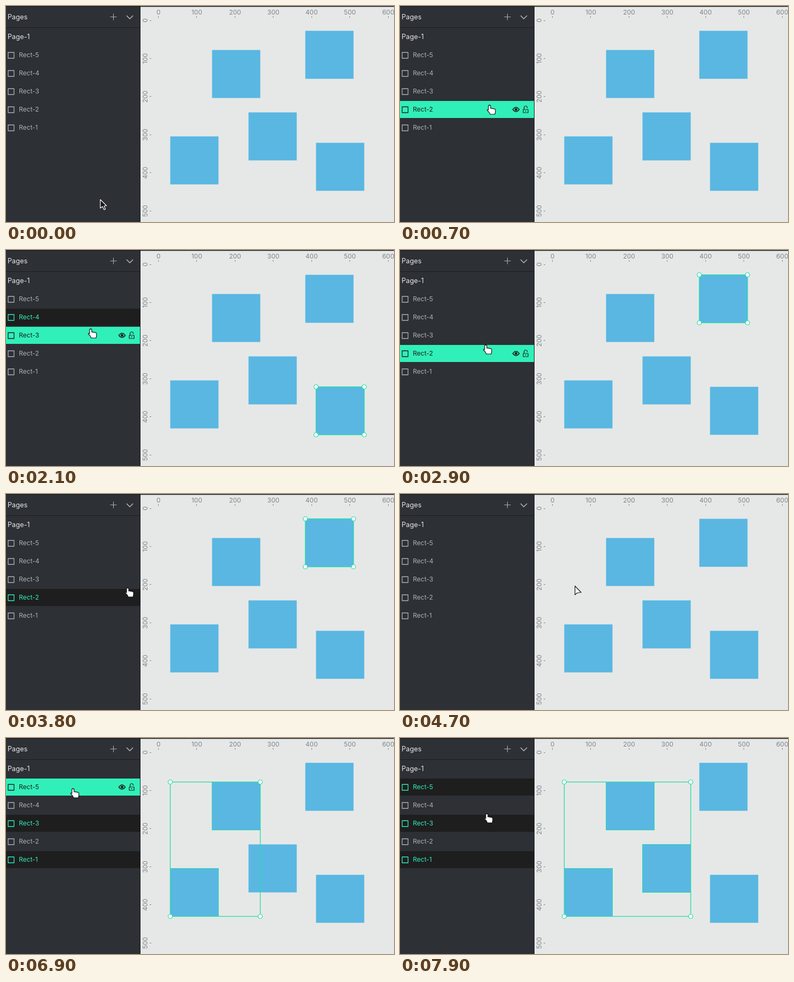
Write an HTML page with a canvas that moves like this. It is 724 by 405 pixels and loops after 8000 ms.

```html
<!DOCTYPE html>
<html lang="en">
<head>
<meta charset="utf-8">
<title>Layer selection</title>
<style>
html, body { margin: 0; overflow: hidden; background: #2d3035; }
canvas { display: block; }
</style>
</head>
<body>
<canvas id="stage" width="724" height="405"></canvas>
<script>
const ctx = document.getElementById('stage').getContext('2d');
const LOOP = 8000, STEP = 100;
const PANEL = '#2d3035', DARK = '#1e1e1f', MINT = '#31efb8', LINE = '#2bdcab', GREY = '#adb0b3';
const SIZE = 90, ROW_HEIGHT = 32;

// Top left corners, indexed by rectangle number
const rects = [null, [384.5, 82.5], [558.5, 46.5], [306.5, 244.5], [578.5, 256.5], [452.5, 199.5]];

// Time, x, y of the pointer tip
const pointer = [
  [0, 176, 363], [300, 176, 363], [900, 162, 97], [1200, 162, 97], [1400, 161, 123],
  [1700, 161, 123], [1900, 161, 146], [2000, 161, 146], [2100, 158, 148], [2300, 158, 148],
  [2700, 160, 178], [3600, 160, 178], [4100, 327, 172], [4600, 327, 172], [4700, 326, 172],
  [5200, 190, 248], [5400, 145, 231], [5700, 145, 231], [5900, 143, 196], [6100, 138, 159],
  [6500, 138, 159], [6900, 125, 95], [7700, 125, 95], [7800, 146, 120], [7900, 162, 142]
];

const selections = [
  [0, []], [1200, [5]], [1700, [4]], [2300, [3]], [2900, [2]],
  [4300, []], [5600, [1]], [6400, [1, 3]], [7500, [1, 3, 5]]
];

const arrow = new Path2D('M0 0V16L4 13L7 19L9.5 18L7 12L11.5 11.5Z');
const canvasArrow = new Path2D('M.5 .5V17L4.5 13.5L12 12.5Z');
const hand = new Path2D('M-2 1Q0 -1 2 1V6Q4 5 5 6.5Q7 5.5 8 7Q11 6.5 11 9V12Q11 14 10 17H1Q0 13 -4 10Q-5 7 -2 9Z');
const eye = new Path2D('M-6 0Q0 -8 6 0Q0 8 -6 0Z');
const lock = new Path2D('M-4.5 0H4.5V6H-4.5ZM-3 0V-3.5A3 3 0 0 1 3 -3.5V-2.5M0 2V4');

const rowTop = n => 76 + (5 - n) * 34;

function pointerAt(t) {
  const next = pointer.findIndex(key => key[0] > t);
  if (next < 0) return pointer.at(-1).slice(1);
  const [t0, x0, y0] = pointer[next - 1], [t1, x1, y1] = pointer[next];
  const k = (t - t0) / (t1 - t0);
  return [x0 + (x1 - x0) * k, y0 + (y1 - y0) * k].map(Math.round);
}

function box(color, x, y, w, h) {
  ctx.fillStyle = color;
  ctx.fillRect(x, y, w, h);
}

function text(label, x, y, size, color, align = 'left') {
  ctx.font = `${size}px Inter, sans-serif`;
  ctx.textAlign = align;
  ctx.fillStyle = color;
  ctx.fillText(label, x, y);
}

function shape(path, x, y, fill, stroke, width = 1) {
  ctx.save();
  ctx.translate(x, y);
  ctx.lineWidth = width;
  ctx.lineJoin = 'round';
  if (fill) { ctx.fillStyle = fill; ctx.fill(path); }
  if (stroke) { ctx.strokeStyle = stroke; ctx.stroke(path); }
  ctx.restore();
}

function drawRulers() {
  const color = '#7e8489';
  for (let i = 0; i <= 6; i++) {
    const x = 284.5 + i * 71.45, y = 27 + i * 71.45;
    text(i * 100, x, 15.5, 12, color, 'center');
    box(color, Math.floor(x), 19, 1, 3);
    box(color, 268, Math.floor(y), 3, 1);
    ctx.save();
    ctx.translate(263.5, y);
    ctx.rotate(-Math.PI / 2);
    text(i * 100, 0, 0, 12, color, 'center');
    ctx.restore();
  }
}

function drawSelection(selected) {
  if (!selected.length) return;
  const xs = selected.map(n => rects[n][0]), ys = selected.map(n => rects[n][1]);
  const left = Math.min(...xs), right = Math.max(...xs) + SIZE;
  const top = Math.min(...ys), bottom = Math.max(...ys) + SIZE;
  ctx.strokeStyle = LINE;
  ctx.lineWidth = 1;
  for (const n of selected) ctx.strokeRect(...rects[n], SIZE, SIZE);
  ctx.lineWidth = 1.4;
  ctx.strokeRect(left, top, right - left, bottom - top);
  const handle = new Path2D();
  handle.arc(0, 0, 4, 0, 7);
  for (const x of [left, right])
    for (const y of [top, bottom]) shape(handle, x, y, '#fff', LINE, 1.2);
}

function drawPanel(selected, hovered) {
  box(PANEL, 0, 0, 250, 405);
  box('#1c1d20', 0, 40, 250, 1);
  box('#1c1d20', 250, 0, 1, 405);
  text('Pages', 3, 25, 12.7, '#e6e7e8');
  text('Page-1', 3, 62, 12.7, '#e6e7e8');
  shape(new Path2D('M-6 0H6M0 -6V6'), 200.5, 20.5, null, GREY, 1.1);
  shape(new Path2D('M-6 -3L0 3L6 -3'), 231, 21, null, '#c5c7c9', 1.3);
  for (let n = 5; n; n--) {
    const y = rowTop(n), hot = n === hovered, on = selected.includes(n);
    if (hot || on) box(hot ? MINT : DARK, 0, y, 250, ROW_HEIGHT);
    const color = hot ? DARK : on ? MINT : GREY;
    shape(new Path2D('M0 0H11V11H0Z'), 4, y + 11, null, color, 1.3);
    text(`Rect-${n}`, 24, y + 20, 12, color);
    if (!hot) continue;
    shape(eye, 216.5, y + 16, null, DARK, 1.5);
    const pupil = new Path2D();
    pupil.arc(0, 0, 2.5, 0, 7);
    shape(pupil, 216.5, y + 16, DARK);
    shape(lock, 234.5, y + 16, null, DARK, 1.2);
  }
}

function drawPointer(x, y) {
  if (x > 250) shape(canvasArrow, x, y, '#f4f5f5', '#151515', 1.2);
  else if (y >= 76 && y < 244) shape(hand, x, y, '#fff', '#111', 1.2);
  else shape(arrow, x, y, '#151617', '#fff', 1.2);
}

function draw(now) {
  const t = Math.floor(now % LOOP / STEP) * STEP;
  const [x, y] = pointerAt(t);
  const selected = selections.findLast(s => s[0] <= t)[1];
  const hovered = [1, 2, 3, 4, 5].find(n => x < 250 && y >= rowTop(n) && y < rowTop(n) + ROW_HEIGHT);

  box('#e6e8e7', 251, 0, 473, 405);
  drawRulers();
  for (const corner of rects.slice(1)) box('#59b7e2', ...corner, SIZE, SIZE);
  drawSelection(selected);
  drawPanel(selected, hovered);
  box('#1c1d20', 0, 0, 724, 1.5);
  drawPointer(x, y);
}

const start = performance.now();
function tick() {
  draw(performance.now() - start);
  requestAnimationFrame(tick);
}
tick();
</script>
</body>
</html>
```
